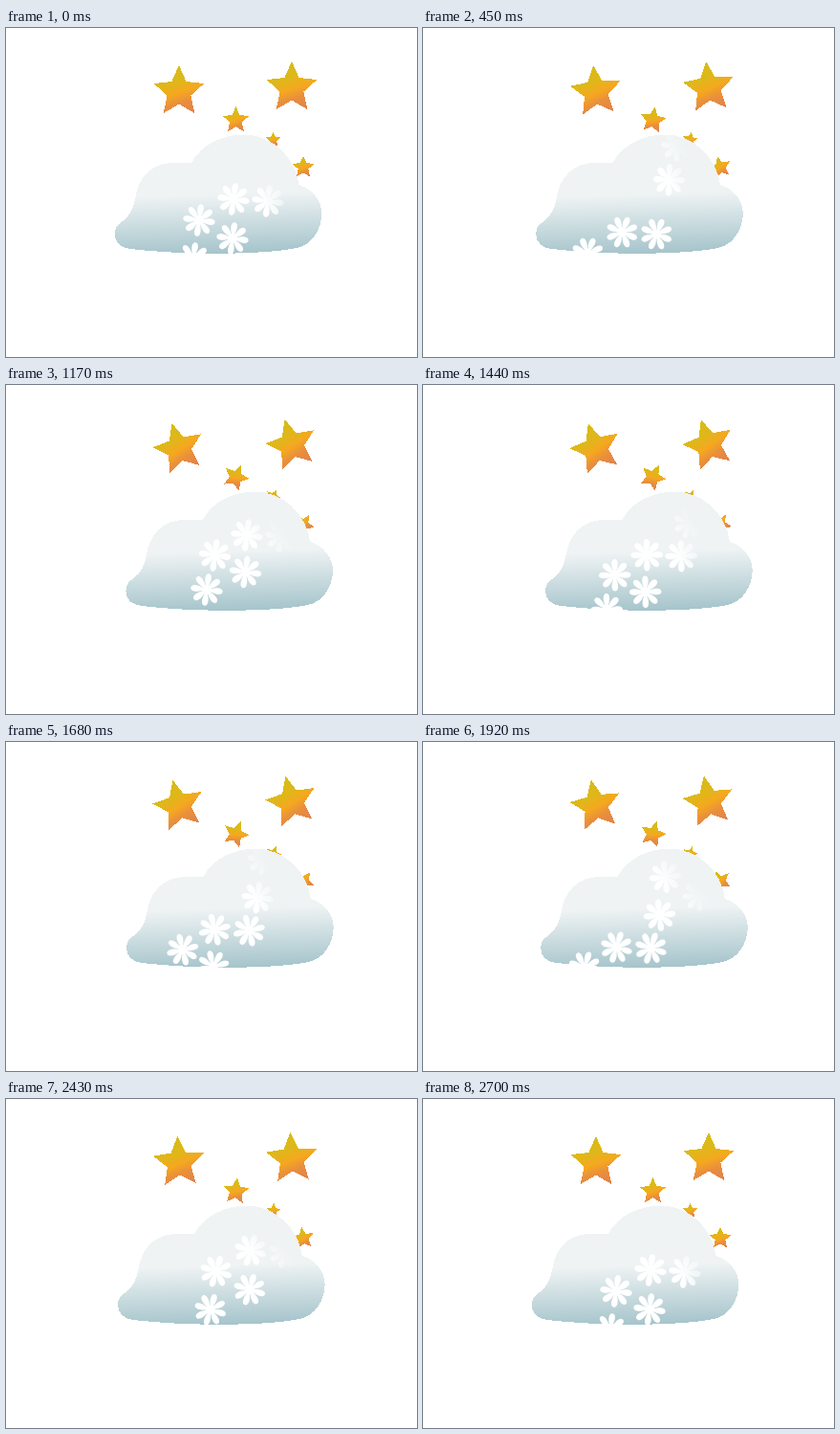
These frames come from a looping animation (430 by 344 pixels, 2730 ms). An HTML page:

```html
<!DOCTYPE html>
<html lang="en">
<head>
<meta charset="utf-8">
<title>Snowy night</title>
<style>
  html, body { margin: 0; width: 100%; height: 100%; overflow: hidden; background: #fff; }
  svg { display: block; width: 100vw; height: 100vh; }
  #stars, #cloud { shape-rendering: crispEdges; }
</style>
</head>
<body>
<svg viewBox="0 0 430 344" xmlns="http://www.w3.org/2000/svg">
  <defs>
    <linearGradient id="gold" x1=".33" y1="0" x2=".67" y2="1">
      <stop offset="0" stop-color="#d6bd18"/>
      <stop offset=".35" stop-color="#dfb71a"/>
      <stop offset=".57" stop-color="#f5a81f"/>
      <stop offset=".76" stop-color="#e98f3c"/>
      <stop offset="1" stop-color="#e0834c"/>
    </linearGradient>
    <linearGradient id="mist" gradientUnits="userSpaceOnUse" x1="220" y1="174" x2="222" y2="238">
      <stop offset="0" stop-color="#eff3f4"/>
      <stop offset="1" stop-color="#a3c3ca"/>
    </linearGradient>
    <linearGradient id="fade" gradientUnits="userSpaceOnUse" x1="272" y1="190" x2="303" y2="171.5">
      <stop offset="0" stop-color="#fff"/>
      <stop offset="1" stop-color="#000"/>
    </linearGradient>
    <mask id="veil" maskUnits="userSpaceOnUse" x="0" y="0" width="430" height="344">
      <rect width="430" height="344" fill="url(#fade)"/>
    </mask>
  </defs>
  <g id="stars" fill="url(#gold)"></g>
  <path id="cloud" fill="url(#mist)" d="M194 141C204 122 226 111.5 249 111.5C278 111.5 303 135 306.5 164
    C320 168 330.3 180 330.3 194C330.3 210 320 227 304 230C270 237 190 238 130 231
    C120 230 113.7 224 113.7 215.5C113.7 209 117 205 121.5 202.5C130 196 133 189 135 179
    C138 156 153 141 175 141C183 140.5 189 140.5 194 141Z"/>
  <g id="snow" fill="#fff" mask="url(#veil)"></g>
</svg>
<script>
const LOOP = 2730, CYCLE = 2700, STEP = 30;
const $ = id => document.getElementById(id);

function add(parent, d) {
  const el = document.createElementNS('http://www.w3.org/2000/svg', 'path');
  el.setAttribute('d', d);
  return parent.appendChild(el);
}

function starPath(r) {
  const pts = [];
  for (let i = 0; i < 10; i++) {
    const a = i * Math.PI / 5, q = i % 2 ? r * 0.47 : r;
    pts.push((q * Math.sin(a)).toFixed(2) + ' ' + (-q * Math.cos(a)).toFixed(2));
  }
  return 'M' + pts.join('L') + 'Z';
}

// Eight teardrop petals around the centre
function flakePath() {
  let d = '';
  for (let i = 0; i < 8; i++) {
    const a = i * Math.PI / 4, c = Math.cos(a), s = Math.sin(a);
    const p = (x, y) => (x * c - y * s).toFixed(2) + ' ' + (x * s + y * c).toFixed(2);
    d += `M${p(-1.6, 0)}L${p(-1.8, -5)}C${p(-4.2, -11)} ${p(-3.6, -16.8)} ${p(0, -16.8)}`
      + `C${p(3.6, -16.8)} ${p(4.2, -11)} ${p(1.8, -5)}L${p(1.6, 0)}Z`;
  }
  return d;
}

// x, y, radius, largest turn in degrees
const stars = [
  [181, 66.6, 27.7, -18], [299, 62.6, 27.7, -18],
  [240.5, 96.5, 14.3, 28], [279.5, 117, 8.3, 28], [311, 145.7, 12, -45]
].map(([x, y, r, turn]) => ({ x, y, turn, el: add($('stars'), starPath(r)) }));

// Two flurries; positions hold at the time "at"
const flurries = [
  { at: 0, spots: [[238, 179], [274, 181], [202, 201], [237, 220], [196, 241]] },
  { at: 1170, spots: [[252, 157], [288, 158], [218.5, 178], [250.5, 195.5], [210, 214]] }
];
const flakes = flurries.flatMap(({ at, spots }) =>
  spots.map(([x, y]) => ({ at, x, y, el: add($('snow'), flakePath()) })));

// Linear rise to 1 at the peak, then linear fall
const sway = (t, peak) => t < peak ? t / peak : (CYCLE - t) / (CYCLE - peak);

function place(el, x, y, turn) {
  el.setAttribute('transform', `translate(${x.toFixed(2)} ${y.toFixed(2)}) rotate(${turn.toFixed(2)})`);
}

function draw(ms) {
  const t = Math.floor((ms % LOOP) / STEP) * STEP;
  place($('cloud'), 14.8 * sway(t, 1480), 0, 0);
  for (const s of stars) place(s.el, s.x, s.y, s.turn * sway(t, 1365));
  for (const f of flakes) {
    const half = CYCLE / 2;
    const u = (t - f.at + half + CYCLE) % CYCLE - half;
    place(f.el, f.x - 0.066 * u, f.y + 0.0768 * u, 8 + 360 * u / CYCLE);
  }
}

let start;
function tick(now) {
  if (start === undefined) start = now;
  draw(Math.max(0, now - start));
  requestAnimationFrame(tick);
}
draw(0);
requestAnimationFrame(tick);
</script>
</body>
</html>
```
